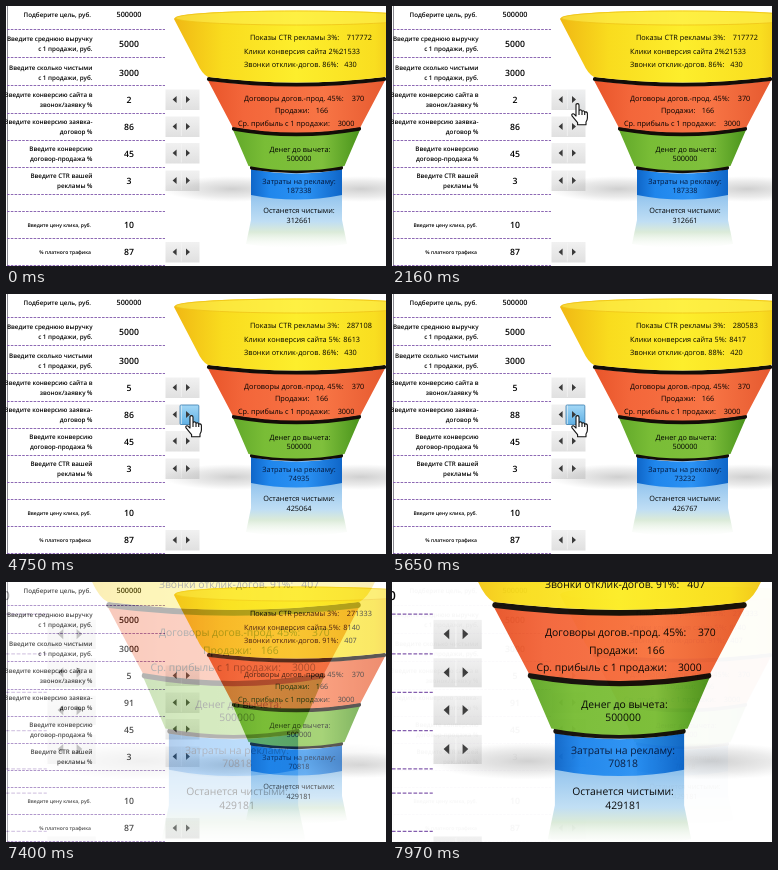
These frames come from a looping animation (380 px wide and 260 px high, 8 s). An HTML page:

```html
<!DOCTYPE html>
<html lang="ru">
<head>
<meta charset="utf-8">
<title>Воронка продаж</title>
<style>
html, body { margin: 0; width: 100%; height: 100%; overflow: hidden; background: #fff; }
svg { display: block; width: 380px; height: 260px; }
text { font-family: "Open Sans", "Noto Sans", sans-serif; fill: #000; text-rendering: geometricPrecision; }
.label { font-size: 6.25px; font-weight: 600; text-anchor: end; }
.small { font-size: 5px; }
.value { font-size: 8.7px; font-weight: 600; text-anchor: middle; }
.goal { font-size: 7.3px; }
.note { font-size: 7.3px; font-weight: 500; }
.mid { text-anchor: middle; }
.end { text-anchor: end; }
.navy { fill: #04183c; }
</style>
</head>
<body>
<svg viewBox="0 0 380 260">
  <defs>
    <linearGradient id="yellow">
      <stop offset="0" stop-color="#f0b814"/><stop offset=".2" stop-color="#f9dc1e"/>
      <stop offset=".5" stop-color="#fdee2c"/><stop offset=".82" stop-color="#f9de20"/>
      <stop offset="1" stop-color="#e9b014"/>
    </linearGradient>
    <linearGradient id="orange">
      <stop offset="0" stop-color="#e8552a"/><stop offset=".2" stop-color="#f3663a"/>
      <stop offset=".65" stop-color="#f87545"/><stop offset="1" stop-color="#e65a30"/>
    </linearGradient>
    <linearGradient id="green">
      <stop offset="0" stop-color="#62a82a"/><stop offset=".25" stop-color="#79bd36"/>
      <stop offset=".7" stop-color="#7fc03c"/><stop offset="1" stop-color="#4a941c"/>
    </linearGradient>
    <linearGradient id="blue">
      <stop offset="0" stop-color="#0f66c8"/><stop offset=".2" stop-color="#1f86ec"/>
      <stop offset=".6" stop-color="#2b92f4"/><stop offset="1" stop-color="#0f66c8"/>
    </linearGradient>
    <linearGradient id="mirror" x2="0" y2="1">
      <stop offset="0" stop-color="#86bdec" stop-opacity=".9"/>
      <stop offset=".5" stop-color="#b4d8f2" stop-opacity=".85"/>
      <stop offset=".7" stop-color="#cfe4cc" stop-opacity=".75"/>
      <stop offset="1" stop-color="#eef6ea" stop-opacity="0"/>
    </linearGradient>
    <linearGradient id="key" x2="0" y2="1">
      <stop offset="0" stop-color="#f1f1f1"/><stop offset="1" stop-color="#e0e0e0"/>
    </linearGradient>
    <linearGradient id="lit" x2="0" y2="1">
      <stop offset="0" stop-color="#a4d8f6"/><stop offset="1" stop-color="#5fb0e4"/>
    </linearGradient>
    <radialGradient id="shade">
      <stop offset="0" stop-color="#888" stop-opacity=".4"/>
      <stop offset=".6" stop-color="#999" stop-opacity=".2"/>
      <stop offset="1" stop-color="#aaa" stop-opacity="0"/>
    </radialGradient>
  </defs>
  <g id="scene"><rect x="-20" y="-20" width="520" height="340" fill="#fff"/></g>
  <use id="zoom" href="#scene" transform="translate(-185 -80.7) scale(1.42)"/>
  <path id="hand" fill="#fff" stroke="#111" stroke-width="1.1" stroke-linejoin="round"
    d="M5 13V2Q5 .6 6.5 .6Q8 .6 8 2V8Q8.3 6.8 9.5 6.8Q11 7 11 8.5Q11.3 7.6 12.4 7.7Q13.7 8 13.7 9.4Q14.2 8.7 15.1 8.9Q16.4 9.3 16.4 10.6V15Q16.4 17 15 19V21.8H6.6V19.6L1.2 13.2Q.2 11.6 1.4 10.9Q2.6 10.4 3.6 11.6ZM8 8V12M11 8.5V12M13.7 9.4V12"/>
</svg>
<script>
const LOOP = 8000, AXIS = 290.5;
const byId = id => document.getElementById(id);
const scene = byId('scene'), zoom = byId('zoom'), hand = byId('hand');

function add(tag, attrs, content) {
  const el = document.createElementNS('http://www.w3.org/2000/svg', tag);
  for (const k in attrs) el.setAttribute(k, attrs[k]);
  if (content !== undefined) el.textContent = content;
  scene.appendChild(el);
  return el;
}
const write = (cls, x, y, str) => add('text', { class: cls, x, y }, str);

// Input table
add('path', { d: 'M1.5 0V260', stroke: '#8c8c94', 'stroke-width': 1 });
for (const y of [23.5, 51.5, 79.5, 107.5, 134.5, 161.5, 188.5, 205.5, 232.5, 259.5])
  add('path', { d: `M1 ${y}H159`, stroke: '#8058ac', 'stroke-width': .9, 'stroke-dasharray': '2.6 1.2' });

const rows = [
  [8.5, '500000', 'Подберите цель, руб.'],
  [37.5, '5000', 'Введите среднюю выручку', 'с 1 продажи, руб.'],
  [66.5, '3000', 'Введите сколько чистыми', 'с 1 продажи, руб.'],
  [94, '2', 'Введите конверсию сайта в', 'звонок/заявку %'],
  [120.5, '86', 'Введите конверсию заявка-', 'договор %'],
  [147.5, '45', 'Введите конверсию', 'договор-продажа %'],
  [175, '3', 'Введите CTR вашей', 'рекламы %'],
  [219, '10', 'Введите цену клика, руб.'],
  [246, '87', '% платного трафика']
];
const cells = rows.map(([y, value, first, second], i) => {
  const cls = i > 6 ? 'label small' : 'label';
  write(cls, second ? 86.5 : 85, second ? y - 2.6 : y + 2.4, first);
  if (second) write(cls, 86.5, y + 7.4, second);
  return write(i ? 'value' : 'value goal', 123, y + (i ? 3.2 : 2.7), value);
});

// Spin buttons
const lights = [83.5, 110.5, 137, 164.5, 236].map(y => {
  add('rect', { x: 159.5, y, width: 34, height: 20.5, fill: 'url(#key)' });
  const lit = add('rect', { x: 174, y: y + .5, width: 18.8, height: 19.5, rx: 1, fill: 'url(#lit)', stroke: '#3c7fb1', 'stroke-width': .8, opacity: 0 });
  const c = y + 10;
  add('path', { d: `M170.6 ${c - 3.6}v7.2l-4-3.6zM180 ${c - 3.6}v7.2l4-3.6z`, fill: '#3a3a3a' });
  add('path', { d: `M175.3 ${y + 1}v18.5`, stroke: '#f6f6f6', 'stroke-width': .7 });
  return lit;
});

// Funnel
const arc = (half, y, bulge) => `M${AXIS - half} ${y}Q${AXIS} ${y + bulge * 2} ${AXIS + half} ${y}`;
function tier(top, y0, bottom, y1, bulge, fill) {
  const d = `${arc(top, y0, bulge)}L${AXIS + bottom} ${y1}Q${AXIS} ${y1 + bulge * 2} ${AXIS - bottom} ${y1}Z`;
  add('path', { d, fill: `url(#${fill})` });
}
const band = (half, y, bulge) => add('path', {
  d: arc(half, y, bulge), fill: 'none', stroke: '#120d08', 'stroke-width': 4.2, 'stroke-linecap': 'round'
});
add('ellipse', { cx: 226, cy: 183, rx: 70, ry: 13, fill: 'url(#shade)' });
add('ellipse', { cx: 355, cy: 183, rx: 70, ry: 13, fill: 'url(#shade)' });
add('path', { d: 'M245 189H336V214L341 238Q290.5 246 240 238L245 214Z', fill: 'url(#mirror)' });
tier(45.5, 163, 45.5, 189, 4.5, 'blue');
band(44.5, 161.7, 3.5);
tier(63.5, 124, 48, 160, 4.5, 'green');
band(62.5, 122.7, 5.5);
tier(88.5, 74.5, 64, 121, 5.5, 'orange');
band(87.5, 73, 5.5);
add('path', { d: `M168 13Q169 5 ${AXIS} 4.5Q412 5 413 13L390 57Q385 68 379 71Q${AXIS} 82 202 71Q196 68 191 57Z`, fill: 'url(#yellow)' });
add('ellipse', { cx: AXIS, cy: 12, rx: 121, ry: 7, fill: '#fff45a', 'fill-opacity': .5, stroke: '#efc418', 'stroke-width': .8 });

// Funnel captions
write('note', 244, 34, 'Показы CTR рекламы 3%:');
const clickNote = write('note', 238, 48);
const callNote = write('note', 238, 61);
write('note', 238, 95, 'Договоры догов.-прод. 45%:');
write('note', 269, 107.3, 'Продажи:');
write('note', 232, 119.8, 'Ср. прибыль с 1 продажи:');
write('note mid', 352, 95, '370');
write('note mid', 316, 107.3, '166');
write('note mid', 340, 119.8, '3000');
write('note mid', 294, 145.5, 'Денег до вычета:');
write('note mid', 293, 155, '500000');
write('note mid navy', 293, 177.7, 'Затраты на рекламу:');
write('note mid', 293, 206.6, 'Останется чистыми:');
const shows = write('note mid', 353.3, 34);
const clicks = write('note end', 354, 48);
const calls = write('note mid', 344.5, 61);
const cost = write('note mid navy', 293, 187);
const left = write('note mid', 293, 216.6);

const siteClicks = [2160, 2710, 3350];
const dealClicks = [4750, 5400, 5650, 5890, 6440];
const LAG = 60;
const count = (list, t) => list.filter(s => t >= s + LAG).length;
const clamp = v => Math.max(0, Math.min(1, v));
const ease = v => v * v * (3 - 2 * v);

function showNumbers(site, deal) {
  const nCalls = 500000 / 3000 / .45 / (deal / 100);
  const nClicks = nCalls / (site / 100);
  const spent = nClicks * 10 * .87;
  const put = (el, v) => { el.textContent = Math.floor(v); };
  cells[3].textContent = site;
  cells[4].textContent = deal;
  clickNote.textContent = `Клики конверсия сайта ${site}%:`;
  callNote.textContent = `Звонки отклик-догов. ${deal}%:`;
  put(shows, nClicks / .03);
  put(clicks, nClicks);
  put(calls, nCalls);
  put(cost, spent);
  put(left, 500000 - spent);
}

// Pointer stops: time, x, y
const path = [
  [530, 165, 262], [1100, 183, 92], [1340, 177.5, 100], [1430, 179, 97],
  [3780, 179, 97], [3990, 179, 121], [6590, 179, 121], [6830, 179, 229]
];
function pointer(t) {
  let i = 0;
  while (i < path.length - 2 && t >= path[i + 1][0]) i++;
  const [t0, x0, y0] = path[i], [t1, x1, y1] = path[i + 1];
  const k = ease(clamp((t - t0) / (t1 - t0)));
  return [x0 + (x1 - x0) * k, y0 + (y1 - y0) * k];
}

function glow(t, from, to, presses) {
  const hover = clamp((t - from) / 90) * (1 - clamp((t - to) / 90));
  const pressed = presses.some(s => t >= s && t < s + 160);
  return hover * (pressed ? 1 : .88);
}

let lastKey = '';
function draw(t) {
  const site = 2 + count(siteClicks, t), deal = 86 + count(dealClicks, t);
  const key = site + ':' + deal;
  if (key !== lastKey) { showNumbers(site, deal); lastKey = key; }
  lights[0].setAttribute('opacity', glow(t, 2160, 3800, siteClicks));
  lights[1].setAttribute('opacity', glow(t, 3870, 6620, dealClicks));
  const [x, y] = pointer(t);
  hand.setAttribute('transform', `translate(${x.toFixed(2)} ${y.toFixed(2)})`);
  hand.setAttribute('visibility', t >= 560 && t < 6830 ? 'visible' : 'hidden');
  const mix = t < 7160 ? 0 : clamp((t - 7130) / 870);
  zoom.setAttribute('opacity', mix);
  zoom.setAttribute('visibility', mix ? 'visible' : 'hidden');
}

const start = performance.now();
function tick() {
  draw((performance.now() - start) % LOOP);
  requestAnimationFrame(tick);
}
tick();
</script>
</body>
</html>
```
